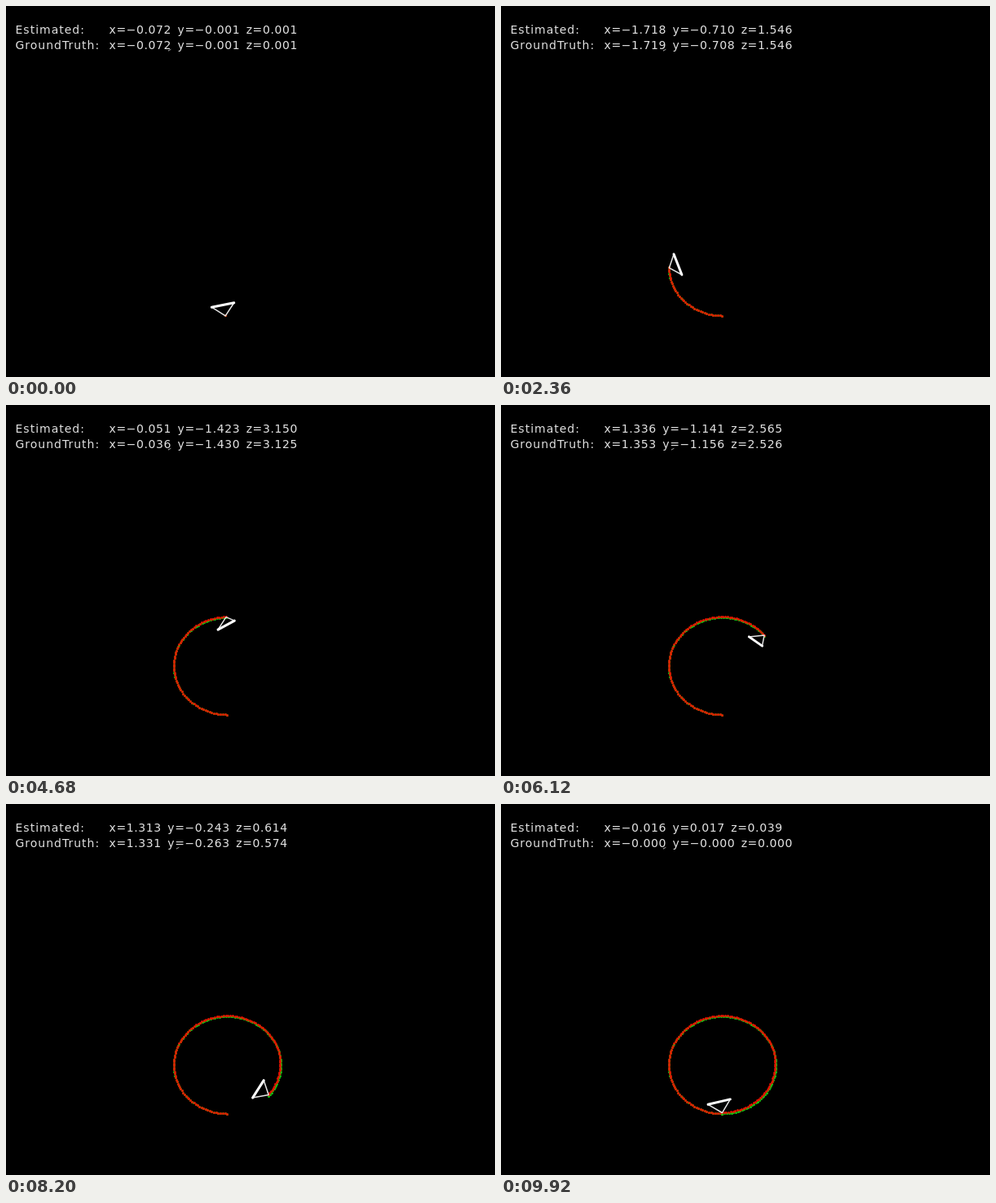
Animation of 600x456 px, one loop 10000 ms. Source, as an HTML page with a canvas:

```html
<!DOCTYPE html>
<html lang="en">
<head>
<meta charset="utf-8">
<title>Estimated and true trajectory</title>
<style>
  html, body { margin: 0; width: 100%; height: 100%; overflow: hidden; background: #000; }
  canvas { display: block; }
</style>
</head>
<body>
<canvas id="stage" width="600" height="456"></canvas>
<script>
const ctx = document.getElementById('stage').getContext('2d');
const LOOP = 10000, TICK = 40, STEP_MS = 64.2, LAST = 149;
const SCALE = 38.2, ORIGIN = { x: 272, y: 381 };

const angle = step => step * 2 * Math.PI / LAST;

function smoothstep(from, to, v) {
  const u = Math.min(1, Math.max(0, (v - from) / (to - from)));
  return u * u * (3 - 2 * u);
}

// A tilted circle; the tiny offset keeps the sign of a negative zero
function groundTruth(step) {
  const a = angle(step), rise = 1 - Math.cos(a);
  return [-1.7186 * Math.sin(a) - 1e-9, -.7153 * rise - 1e-9, 1.5627 * rise];
}

// The estimate wobbles slightly and drifts away during the round
function estimate(step) {
  const [x, y, z] = groundTruth(step);
  const part = step / LAST, wobble = .0015 * Math.sin(angle(step));
  return [
    x + wobble - .016 * smoothstep(.2, .55, part),
    y - 2 * wobble + .017 * smoothstep(.2, .85, part),
    z - wobble + .039 * smoothstep(.2, .7, part)
  ];
}

const project = ([x, , z]) => [ORIGIN.x + SCALE * x, ORIGIN.y - SCALE * z];

function dot(point, color) {
  const [x, y] = project(point).map(Math.floor);
  ctx.fillStyle = color;
  ctx.beginPath();
  ctx.arc(x + .5, y + .5, 1.5, 0, 7);
  ctx.fill();
}

function line(points, width, color) {
  ctx.lineWidth = width;
  ctx.strokeStyle = color;
  ctx.beginPath();
  points.forEach(p => ctx.lineTo(...p));
  ctx.stroke();
}

// The base of the camera pyramid turns about a tilted axis through its tip
function drawCamera(step) {
  const tip = project(estimate(step));
  const cos = Math.cos(angle(step)), sin = Math.sin(angle(step));
  const middle = [
    tip[0] - 1.9 - 1.8 * cos + 12.5 * sin,
    tip[1] - 1.7 - 11.7 * cos - 2.5 * sin
  ];
  const half = [1.7 + 11.9 * cos + 3.1 * sin, 1 - 4.2 * cos + 11.7 * sin];
  const [a, b] = [-1, 1].map(side => middle.map((v, n) => v + side * half[n]));
  line([a, tip, b], 1.5, '#e4e4e4');
  line([a, b], 3, '#fff');
}

function text(string, x, y, spacing) {
  ctx.letterSpacing = spacing + 'px';
  ctx.fillText(string, x, y);
}

function drawRow(label, point, y) {
  const fields = point.map((v, n) => 'xyz'[n] + '=' + v.toFixed(3).replace('-', '\u2212'));
  ctx.fillStyle = '#e0e0e0';
  text(label, 11.5, y, 1);
  text(fields.join(' '), 126.5, y, .6);
}

function draw(time) {
  const t = Math.floor(time % LOOP / TICK) * TICK;
  const step = Math.min(LAST, 1 + Math.floor((t + 10) / STEP_MS));
  const truth = groundTruth(step);

  ctx.fillStyle = '#000';
  ctx.fillRect(0, 0, 600, 456);
  for (let n = step > 1 ? 0 : 1; n <= step; n++) {
    dot(groundTruth(n), '#14c814');
    dot(estimate(n), '#e61400');
  }
  drawCamera(step);

  drawRow('Estimated:', estimate(step), 34);
  drawRow('GroundTruth:', truth, 53);
  const tick = truth[0] < 0 ? 199 : 209;
  line([[tick, 55], [tick + 3, 53.5]], 1, '#aaa');
}

ctx.font = '14px "DejaVu Sans", sans-serif';
ctx.wordSpacing = '2.4px';
ctx.lineCap = ctx.lineJoin = 'round';

const start = performance.now();
function frame() {
  draw(performance.now() - start);
  requestAnimationFrame(frame);
}
frame();
</script>
</body>
</html>
```
